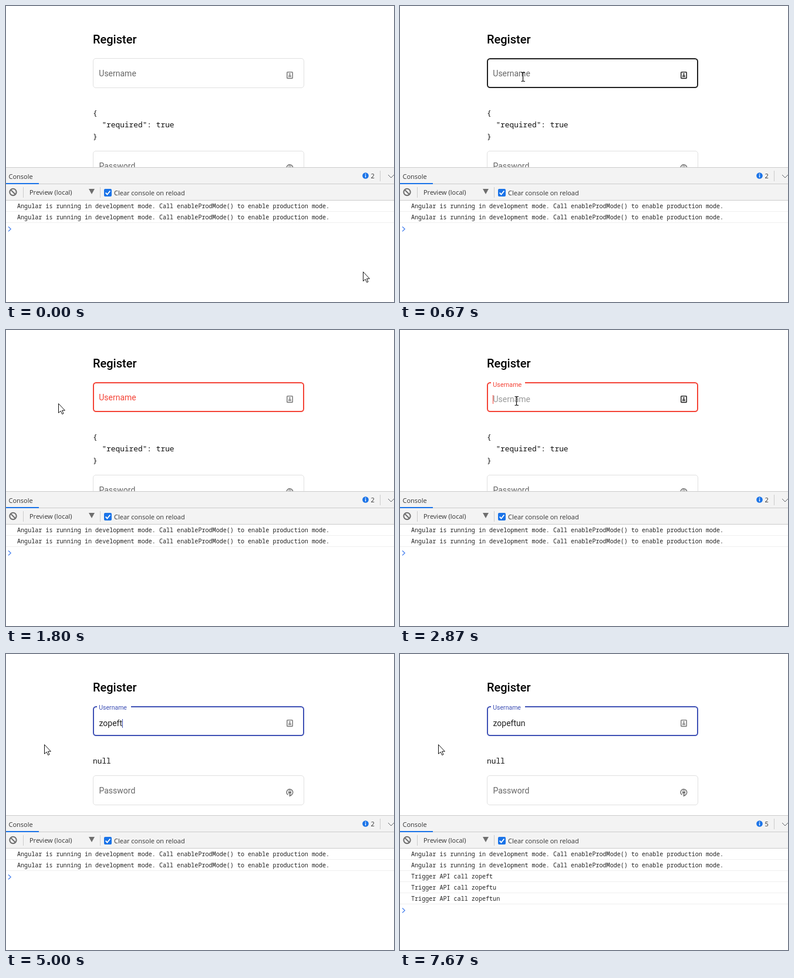
Animation, 661 px wide and 505 px high, one loop 8 s. Source, as an HTML page:

```html
<!DOCTYPE html>
<html lang="en">
<head>
<meta charset="utf-8">
<title>Register form</title>
<style>
  html, body { margin: 0; width: 100%; height: 100%; overflow: hidden; background: #fff; }
  svg { display: block; }
  text { white-space: pre; font: 14px Roboto, sans-serif; fill: rgba(0,0,0,.87); }
  .title { font-size: 20px; font-weight: 500; fill: #000; }
  .hint { fill: rgba(0,0,0,.6); }
  .json text { font: 12.83px "Noto Sans Mono", monospace; fill: #111; }
  .log text { font: 10.08px "Noto Sans Mono", monospace; fill: #222; }
  .ui { font: 11px "Open Sans", sans-serif; fill: #333; }
  .line { fill: none; stroke-width: 1; }
</style>
</head>
<body>
<svg width="661" height="505" viewBox="0 0 661 505">
  <text class="title" x="148" y="64">Register</text>

  <rect id="border" class="line" rx="4.5"/>
  <rect id="gap" x="155" y="88" width="58" height="4" fill="#fff"/>
  <text id="holder" x="158.5" y="123" fill-opacity="0">Username</text>
  <text id="value" x="158.5" y="123"></text>
  <text id="label">Username</text>
  <rect id="caret" y="111" width="1" height="15"/>
  <g id="person">
    <rect x="478.8" y="112.8" width="9.4" height="10.6" rx="1" fill="none" stroke="currentColor" stroke-width="1.6"/>
    <circle cx="483.5" cy="116" r="1.3" fill="currentColor"/>
    <path d="M481.3 119.3q2.2-2.6 4.4 0zM481 120.6h5" fill="currentColor" stroke="currentColor" stroke-width=".9"/>
  </g>

  <g id="json" class="json"></g>

  <g id="password">
    <rect class="line" x="148.5" y=".5" width="359" height="50" rx="4.5" stroke="#e0e0e0"/>
    <text class="hint" x="158.5" y="31">Password</text>
    <path d="M480.5 33.4A5.3 5.3 0 1 1 485.6 33.8" fill="none" stroke="#777" stroke-width="1.6"/>
    <path d="M482.5 31.2L487 34 482.8 36.6z" fill="#777"/>
    <rect x="481" y="27.6" width="5" height="3.6" fill="#777"/>
    <path d="M482 27.6v-1a1.5 1.5 0 0 1 3 0v1" fill="none" stroke="#777"/>
  </g>

  <g id="console">
    <rect y="275" width="661" height="230" fill="#fff"/>
    <rect y="275" width="661" height="57" fill="#f3f3f3"/>
    <path class="line" d="M0 275.5H661M0 303.5H661M0 331.5H661M29.5 309V327M160.5 309V327M637.5 281V299" stroke="#ccc"/>
    <rect y="302" width="56" height="2" fill="#1a73e8"/>
    <text class="ui" x="4.5" y="295">Console</text>
    <circle cx="612.5" cy="289.5" r="5.3" fill="#1a73e8"/>
    <path d="M612.5 286v1.5M612.5 288.5v4" stroke="#fff" stroke-width="1.4"/>
    <text id="count" class="ui" x="621.5" y="294"></text>
    <path class="line" d="M651 288l5 5 5-5" stroke="#5f6368"/>
    <g fill="none" stroke="#6e6e6e" stroke-width="2">
      <circle cx="12" cy="317.5" r="5.7"/><path d="M8 313.5l8 8"/>
    </g>
    <text class="ui" x="40" y="322">Preview (local)</text>
    <path d="M141 312h10l-5 9z" fill="#6e6e6e"/>
    <rect x="167" y="312" width="13" height="13" rx="2" fill="#1a73e8"/>
    <path d="M169.7 318.7l2.7 2.8 5-6" fill="none" stroke="#fff" stroke-width="1.9"/>
    <text class="ui" x="184" y="323">Clear console on reload</text>
    <g id="log" class="log"></g>
    <path id="prompt" d="M4 -4l4.2 4-4.2 4" fill="none" stroke="#4a83f0" stroke-width="1.3"/>
  </g>

  <path id="arrow" d="M.5.6V16.4L4.1 13.1 6.7 18.5 9 17.5 6.5 12.2H11.4Z" fill="#fff" stroke="#111"/>
  <path id="beam" d="M-3-7.5H-1L0-6.5 1-7.5H3.5M-3 7.5H-1L0 6.5 1 7.5H3.5M0-6.5V6.5" fill="none" stroke="#111" stroke-width="1.2"/>
</svg>
<script>
const LOOP = 8000, STEP = 1000 / 15, BLINK = 534;
const USER = 'zopeftun', MIN = 6;
const BLUE = '#3f51b5', RED = '#f44336';
const FOCUS = [700, 2690], BLUR = 1440;
const KEYS = [3999, 4132, 4265, 4465, 4932, 4999, 6132, 7132];
const LOGS = [5066, 6132, 7132];
const NOTICE = 'Angular is running in development mode. Call enableProdMode() to enable production mode.';

// time, x, y of the pointer
const PATH = [
  [0, 608, 453], [67, 602, 445], [133, 580, 412], [200, 530, 345], [267, 458, 255],
  [333, 378, 165], [400, 305, 105], [467, 254, 78], [533, 226, 84], [600, 212, 108],
  [667, 209, 121], [867, 209, 121], [933, 187, 122], [1000, 132, 123], [1067, 95, 124],
  [1133, 83, 124], [1667, 83, 124], [1800, 89, 125], [1867, 104, 125], [1933, 132, 124],
  [2000, 164, 122], [2067, 190, 121], [2133, 201, 121], [2267, 201, 121], [2400, 198, 121],
  [2870, 198, 121], [2933, 190, 123], [3067, 138, 136], [3200, 92, 148], [3333, 68, 153], [3400, 65, 154]
];

const $ = id => document.getElementById(id);
const set = (el, attrs) => { for (const k in attrs) el.setAttribute(k, attrs[k]); };
const show = (el, on) => { el.style.display = on ? '' : 'none'; };
const clamp = v => Math.max(0, Math.min(1, v));
const mix = (a, b, p) => a + (b - a) * p;

// cubic-bezier(.25, .8, .25, 1)
function ease(x) {
  if (x <= 0 || x >= 1) return clamp(x);
  let lo = 0, hi = 1, s;
  for (let i = 0; i < 20; i++) {
    s = (lo + hi) / 2;
    if (.75 * s * (1 - s) + s ** 3 < x) lo = s; else hi = s;
  }
  return 2.4 * s * (1 - s) ** 2 + 3 * s * s * (1 - s) + s ** 3;
}

function pointer(t) {
  const i = PATH.findIndex(p => p[0] > t);
  if (i < 0) return PATH[PATH.length - 1].slice(1);
  const a = PATH[i - 1], b = PATH[i], p = (t - a[0]) / (b[0] - a[0]);
  return [mix(a[1], b[1], p), mix(a[2], b[2], p)].map(Math.round);
}

function errors(n) {
  if (n >= MIN) return null;
  return n ? { minlength: { requiredLength: MIN, actualLength: n } } : { required: true };
}

const lines = (rows, x, y, gap) =>
  rows.map((s, i) => `<text x="${x}" y="${y + i * gap}">${s}</text>`).join('');

let shownJson, shownLog;
function drawJson(n) {
  const text = JSON.stringify(errors(n), null, 2);
  if (text === shownJson) return;
  shownJson = text;
  const rows = text.split('\n');
  $('json').innerHTML = lines(rows, 148, 187, 20);
  set($('password'), { transform: `translate(0 ${187 + 20 * rows.length})` });
}

function drawLog(n) {
  if (n === shownLog) return;
  shownLog = n;
  const rows = [NOTICE, NOTICE];
  for (let i = 0; i < n; i++) rows.push('Trigger API call ' + USER.slice(0, MIN + i));
  const rules = rows.map((_, i) => `M0 ${350.5 + 19 * i}H661`).join('');
  $('log').innerHTML = `<path class="line" d="${rules}" stroke="#efefef"/>` + lines(rows, 19, 345, 19);
  $('count').textContent = rows.length;
  set($('prompt'), { transform: `translate(0 ${342.5 + 19 * rows.length})` });
}

function draw(t) {
  const [x, y] = pointer(t);
  const hover = x >= 148 && x < 508 && y >= 89 && y < 140;
  const n = KEYS.filter(k => k <= t).length;
  const refocused = t >= FOCUS[1];
  const focused = refocused || (t >= FOCUS[0] && t < BLUR);
  const bad = t >= BLUR && n < MIN;
  const accent = bad ? RED : BLUE;
  const thick = hover || focused || bad;

  const start = refocused ? FOCUS[1] : t >= BLUR ? BLUR : FOCUS[0];
  const moved = ease((t - start) / 400);
  const float = focused ? moved : t >= BLUR ? 1 - moved : 0;

  const w = thick ? 2 : 1;
  set($('border'), {
    x: 148 + w / 2, y: 89 + w / 2, width: 360 - w, height: 51 - w,
    style: `stroke-width:${w}`,
    stroke: focused || bad ? accent : hover ? '#212121' : '#e0e0e0'
  });
  show($('gap'), focused);
  set($('label'), {
    transform: `translate(158.3 ${mix(120, 95, float)}) scale(${mix(1, .75, float)})`,
    style: `fill:${focused || bad ? accent : 'rgba(0,0,0,.6)'}`
  });
  const fade = focused && !n ? .42 * ease((t - start - 60) / 200) : 0;
  set($('holder'), { style: `fill:rgba(0,0,0,${fade})`, 'fill-opacity': 1 });

  const value = $('value');
  value.textContent = USER.slice(0, n);
  const last = n ? KEYS[n - 1] : refocused ? 2730 : 730;
  show($('caret'), focused && Math.floor(Math.max(0, t - last) / BLINK) % 2 === 0);
  set($('caret'), { x: Math.floor(158.5 + (n ? value.getComputedTextLength() : 0)), fill: accent });
  set($('person'), { color: hover ? '#2b2b2b' : '#808080' });

  drawJson(n);
  drawLog(LOGS.filter(k => k <= t).length);

  show($('arrow'), !hover);
  show($('beam'), hover);
  set($('arrow'), { transform: `translate(${x} ${y})` });
  set($('beam'), { transform: `translate(${x + .5} ${y})` });
}

const origin = performance.now();
function tick() {
  const t = Math.max(0, performance.now() - origin) % LOOP;
  draw(Math.floor((t + 3.4) / STEP) * STEP % LOOP);
  requestAnimationFrame(tick);
}
tick();
</script>
</body>
</html>
```
